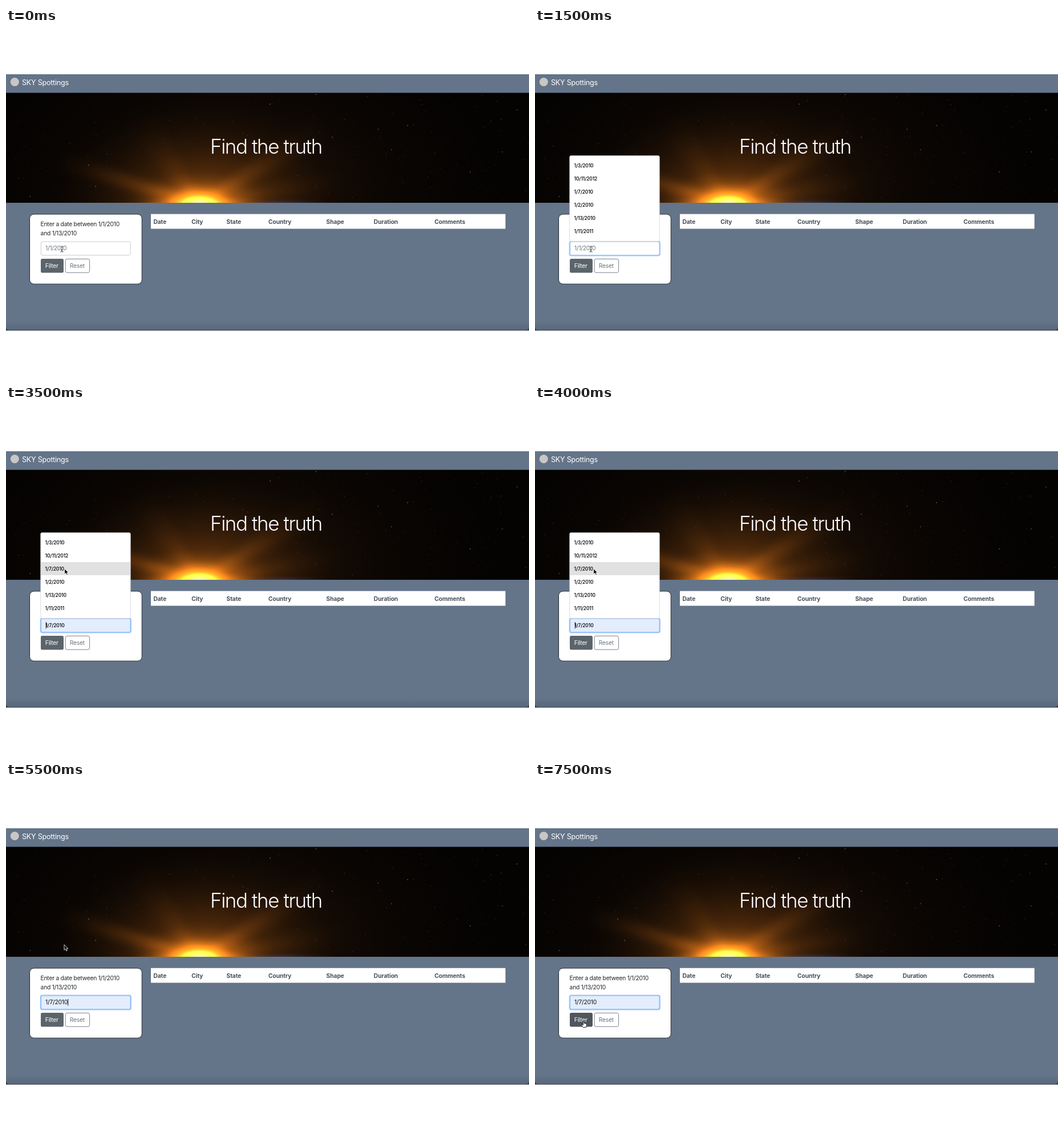
These frames come from a looping animation (917x611 px, 8000 ms). An HTML page with a canvas:

```html
<!DOCTYPE html>
<html lang="en">
<head>
<meta charset="utf-8">
<title>Date filter</title>
<style>
  html, body { margin: 0; width: 100%; height: 100%; overflow: hidden; background: #fff; }
  #hero { position: absolute; left: 0; top: 113px; }
  svg { position: absolute; left: 0; top: 0; }
  text {
    font: 400 10.3px Inter, "Liberation Sans", sans-serif;
    font-optical-sizing: none;
    letter-spacing: -.25px;
    white-space: pre;
  }
  #title { font-size: 35px; font-weight: 300; letter-spacing: -1.45px; fill: #fff; }
  #brand { font-size: 12.6px; fill: #fff; }
  #heads text { font-weight: 700; letter-spacing: -.1px; fill: #48525d; }
  #label text { fill: #212529; }
  .small { font-size: 8.4px; font-weight: 600; letter-spacing: -.15px; fill: #16191c; }
  .off { display: none; }
</style>
</head>
<body>
<canvas id="hero" width="917" height="193"></canvas>
<svg width="917" height="611" viewBox="0 0 917 611">
  <defs>
    <linearGradient id="shade" x1="0" y1="0" x2="0" y2="1">
      <stop offset="0" stop-color="#2f3c4c" stop-opacity="0"/>
      <stop offset="1" stop-color="#2f3c4c" stop-opacity=".22"/>
    </linearGradient>
  </defs>

  <rect y="81" width="917" height="32.5" fill="#647489"/>
  <rect y="515" width="917" height="14.7" fill="#2b333d"/>
  <path id="floor" d="M0 306H917V523Q917 528.8 911 528.8H6Q0 528.8 0 523Z" fill="#647489"/>
  <path d="M0 513H917V523Q917 528.8 911 528.8H6Q0 528.8 0 523Z" fill="url(#shade)"/>

  <circle cx="15.3" cy="94.5" r="7.5" fill="#c9c7c5"/>
  <text id="brand" x="28" y="100.2">SKY Spottings</text>
  <text id="title" x="358" y="219.5">Find the truth</text>

  <rect x="254" y="325.7" width="621.7" height="25.8" fill="#fff"/>
  <g id="heads"></g>

  <rect x="41.5" y="326" width="196.8" height="122.2" rx="7.5" fill="#fff" stroke="#20262d"/>
  <g id="label">
    <text x="60.6" y="347.4">Enter a date between 1/1/2010</text>
    <text x="60.6" y="362.8">and 1/13/2010</text>
  </g>

  <rect id="glow" x="59.6" y="372.4" width="160.4" height="27.2" rx="4" fill="#a9cbfb"/>
  <rect id="field" x="61.4" y="374" width="156.8" height="23.8" rx="2.8" fill="#fff"/>
  <text id="value" x="69" y="389.4"></text>
  <text id="preview" class="small" x="69.2" y="389.4">1/7/2010</text>
  <rect id="caret" y="380" width="1" height="11.5" fill="#111"/>

  <rect id="filter" x="61" y="404" width="40" height="24.6" rx="2.8"/>
  <text x="68.8" y="420.3" fill="#fff">Filter</text>
  <rect x="104.2" y="404.4" width="42.4" height="23.8" rx="2.8" fill="#fff" stroke="#6c757d" stroke-width=".9"/>
  <text x="111.8" y="420.3" fill="#6c757d">Reset</text>

  <g id="list">
    <rect x="60.7" y="223.4" width="157.6" height="150" rx="2.5" fill="#fff" stroke="#c9cdd2" stroke-width=".7"/>
    <rect id="hover" x="61" y="275" width="157" height="23" fill="#e1e1e1"/>
  </g>

  <g id="beam" fill="none" stroke-linecap="round">
    <path id="beamEdge" d="M-2.2 -4.8Q0 -4.8 0 -3.6V3.6Q0 4.8 -2.2 4.8M2.2 -4.8Q0 -4.8 0 -3.6M0 3.6Q0 4.8 2.2 4.8M-1.3 1.2H1.3" stroke="#fff" stroke-width="2"/>
    <path d="M-2.2 -4.8Q0 -4.8 0 -3.6V3.6Q0 4.8 -2.2 4.8M2.2 -4.8Q0 -4.8 0 -3.6M0 3.6Q0 4.8 2.2 4.8M-1.3 1.2H1.3" stroke="#222" stroke-width=".9"/>
  </g>
  <path id="arrow" d="M0 0V9.4L2.2 7.4L3.8 11L5.4 10.3L3.9 6.8H6.8Z" fill="#000" stroke="#fff" stroke-width=".8" stroke-linejoin="round"/>
  <path id="hand" d="M-.9 .4Q0 -.8 .9 .4V3.8Q1.9 3.2 2.5 4Q3.5 3.5 4 4.4Q5.2 4.2 5.2 5.6V7.6L4.2 10.8H-.9L-3.4 7.2Q-4.3 5.8 -3 5.6Q-2 5.6 -.9 7Z" fill="#fff" stroke="#111" stroke-width=".9" stroke-linejoin="round"/>
</svg>

<script>
const $ = id => document.getElementById(id);

function addText(parent, x, y, str, cls) {
  const el = document.createElementNS("http://www.w3.org/2000/svg", "text");
  el.setAttribute("x", x);
  el.setAttribute("y", y);
  if (cls) el.setAttribute("class", cls);
  el.textContent = str;
  parent.append(el);
}

const heads = { Date: 258.4, City: 325.2, State: 386.5, Country: 460, Shape: 561.6, Duration: 644.8, Comments: 751.2 };
for (const name in heads) addText($("heads"), heads[name], 342.6, name);

["1/3/2010", "10/11/2012", "1/7/2010", "1/2/2010", "1/13/2010", "1/11/2011"]
  .forEach((date, i) => addText($("list"), 68.6, 243.5 + i * 23.15, date, "small"));

function paintHero() {
  const g = $("hero").getContext("2d");
  const W = 917, H = 193;
  let seed = 71;
  const rnd = () => (seed = (seed * 16807) % 2147483647) / 2147483647;

  const glow = (x, y, rx, ry, rgb, alpha) => {
    g.save();
    g.translate(x, y);
    g.scale(rx, ry);
    const grad = g.createRadialGradient(0, 0, 0, 0, 0, 1);
    for (let i = 0; i <= 8; i++) {
      const k = i / 8;
      grad.addColorStop(k, `rgba(${rgb},${alpha * (1 - k) ** 2})`);
    }
    g.fillStyle = grad;
    g.fillRect(-1, -1, 2, 2);
    g.restore();
  };

  // Soft light ray from the sun towards (x, y), widening to w
  const ray = (x, y, w, alpha) => {
    const sx = 338, sy = 196;
    const len = Math.hypot(x - sx, y - sy);
    const nx = -(y - sy) / len * w, ny = (x - sx) / len * w;
    const grad = g.createRadialGradient(sx, sy, 0, sx, sy, len);
    grad.addColorStop(0, `rgba(190,100,20,${alpha})`);
    grad.addColorStop(1, "rgba(100,50,10,0)");
    g.save();
    g.filter = "blur(8px)";
    g.fillStyle = grad;
    g.beginPath();
    g.moveTo(sx - nx * .2, sy - ny * .2);
    g.lineTo(x - nx, y - ny);
    g.lineTo(x + nx, y + ny);
    g.lineTo(sx + nx * .2, sy + ny * .2);
    g.fill();
    g.restore();
  };

  g.fillStyle = "#050302";
  g.fillRect(0, 0, W, H);
  g.globalCompositeOperation = "lighter";
  glow(400, 170, 470, 290, "46,25,7", .75);
  glow(338, 196, 270, 190, "120,62,12", .8);
  ray(90, 118, 16, .55);
  ray(560, 60, 24, .3);
  ray(600, 150, 16, .2);
  ray(230, 40, 30, .15);
  glow(490, 197, 105, 13, "22,42,110", .95);
  glow(338, 194, 140, 62, "215,112,18", .85);
  glow(338, 196, 125, 20, "240,140,30", .8);
  glow(338, 194, 66, 40, "255,170,50", .85);
  glow(340, 194, 42, 16, "255,225,140", .9);

  for (let i = 0; i < 460; i++) {
    const x = rnd() * W, y = rnd() * H, b = rnd();
    const near = Math.hypot((x - 338) / 150, (y - 193) / 80);
    if (near < 1) continue;
    const size = b > .95 ? 1.3 : .9;
    g.fillStyle = `rgba(205,185,160,${.08 + .6 * b ** 5})`;
    g.fillRect(x, y, size, size);
  }
}
paintHero();

// One entry per half second; each one changes only what it names.
const BEAT = 500;
const changes = [
  { cursor: ["beam", 98, 387.3], focus: 0, value: "1/1/2010", list: false, fill: false, caret: 0, press: false },
  { focus: 1, list: true, caret: 69.8 },
  { focus: 2 },
  { caret: 0 },
  {},
  { cursor: ["beam", 101, 388], caret: 69.8 },
  { cursor: ["arrow", 100.8, 358.6], caret: 0 },
  { cursor: ["arrow", 102.8, 286.8], fill: true, caret: 69.8 },
  {},
  {},
  { cursor: ["arrow", 102, 284.8] },
  { list: false, value: "1/7/2010", caret: 108.2 },
  { caret: 0 },
  { cursor: ["arrow", 98, 348] },
  { cursor: ["hand", 85.2, 418.8], press: true },
  {}
];
let last = {};
const states = changes.map(c => last = { ...last, ...c });

const show = (id, on) => $(id).classList.toggle("off", !on);
const set = (id, key, val) => $(id).setAttribute(key, val);

function draw(s) {
  const previewing = s.list && s.fill;
  show("list", s.list);
  show("hover", previewing);
  show("preview", previewing);
  show("value", !previewing);
  $("value").textContent = s.value;
  set("value", "fill", s.fill ? "#111" : "#6c757d");

  show("glow", s.focus === 2);
  set("field", "fill", s.fill ? "#e3edfc" : "#fff");
  set("field", "stroke", ["#c6ccd3", "#a5c9f5", "#82b3fa"][s.focus]);
  show("caret", s.caret);
  set("caret", "x", s.caret);
  set("filter", "fill", s.press ? "#4f565d" : "#5c646b");

  const [kind, x, y] = s.cursor;
  for (const id of ["beam", "arrow", "hand"]) show(id, id === kind);
  set(kind, "transform", `translate(${x} ${y})`);
}

let shown = -1;
function tick() {
  const i = Math.floor(performance.now() / BEAT) % states.length;
  if (i !== shown) draw(states[shown = i]);
  requestAnimationFrame(tick);
}
tick();
</script>
</body>
</html>
```
